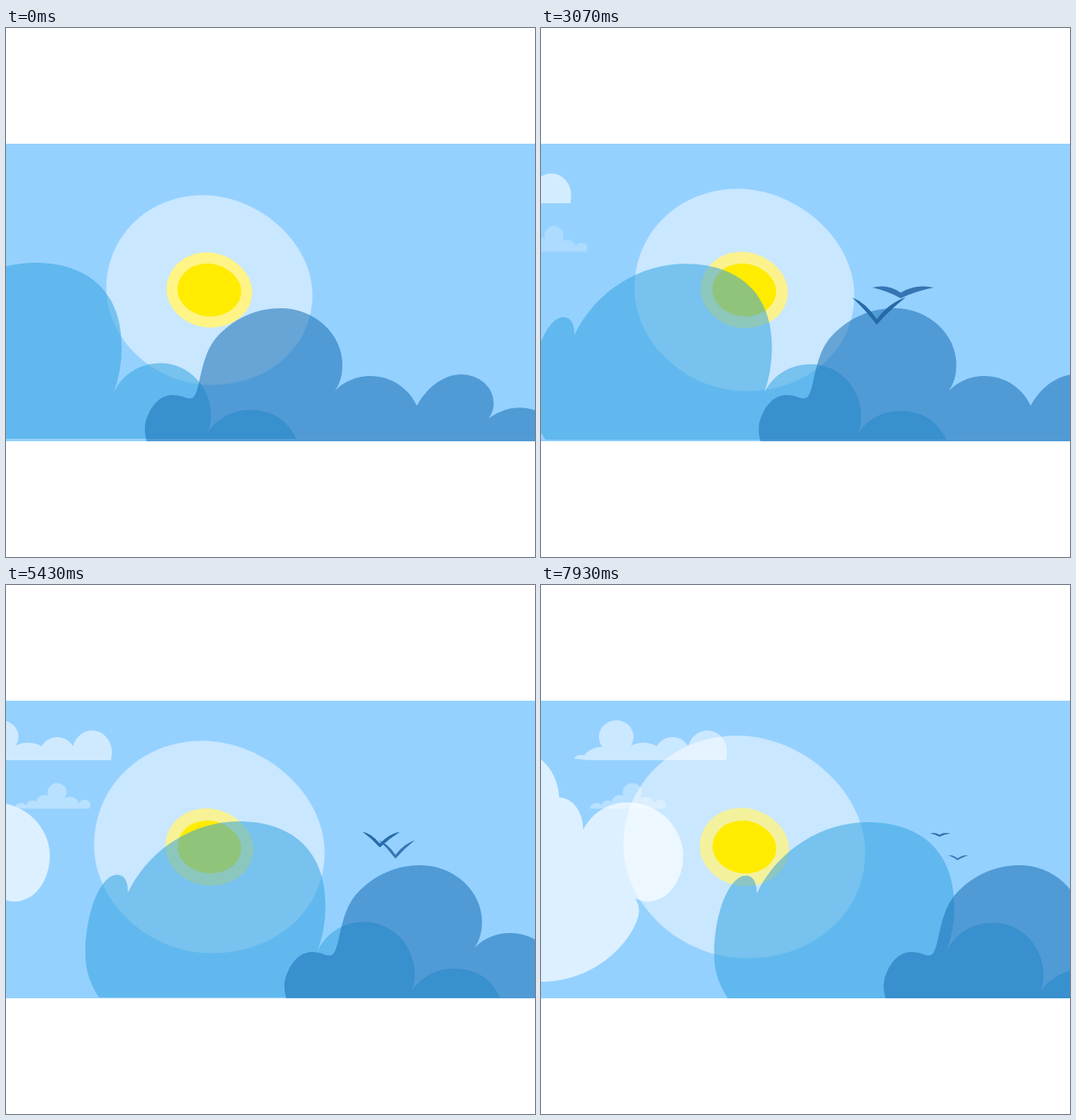
An HTML page that plays this animation: 640x640 px, repeating every 8 s.

```html
<!DOCTYPE html>
<html lang="en">
<head>
<meta charset="utf-8">
<title>Sun and clouds</title>
<style>
html, body { margin: 0; width: 100%; height: 100%; overflow: hidden; background: #fff; }
svg { display: block; width: 100%; height: 100%; }
</style>
</head>
<body>
<svg viewBox="0 0 640 640">
  <defs>
    <clipPath id="sky"><rect y="140" width="640" height="360"/></clipPath>
    <path id="blob" d="M-1-.02C-1-.56-.6-1-.06-1S1-.5 1 .05S.57 1 .02 1S-1 .52-1-.02Z"/>
  </defs>
  <g clip-path="url(#sky)">
    <rect y="140" width="640" height="360" fill="#95d1ff"/>
    <use id="glow" href="#blob" fill="#c9e7ff"/>
    <use id="ring" href="#blob" fill="#fff485"/>
    <use id="sun" href="#blob" fill="#ffec00"/>
    <path id="wisp" fill="#fff" d="M59 270.5A8 8 0 0 1 73 266.5A8 8 0 0 1 85 262A11 11 0 0 1 100 255A11.5 11 0 1 1 118 259A12 12 0 0 1 137 264A8 8 0 0 1 149.5 262Q152.5 265 149.5 270.5Z"/>
    <path id="high" fill="#fff" d="M40 210A9 6 0 0 1 52 206A30 24 0 0 1 74 195.5A21 20 0 1 1 109 194A36 36 0 0 1 140 195A22 22 0 0 1 178 195A24 26 0 0 1 225 200Q225 207 224 212H66Q52 212 40 210Z"/>
    <path id="white" fill="#fff" opacity=".68" d="M0 211Q20 228 22 257A29 39 0 0 1 51 296C62 275 82 263 104 263A68 65 0 0 1 172 328A43 55 0 0 1 129 383Q121 383 114 379Q122 392 116 406C103 440 60 480 0 480Z"/>
    <path id="light" fill="#35a5e0" opacity=".55" d="M226 500Q209 475 209.5 446C210 396 228 351.5 248 351.5Q261 352 261 373C288 318 342 287 395 287C463 287 500 326 500 388Q500 420 489 447C498 424 520 408.5 547 408.5A61 64 0 0 1 608 472Q608 483 604 492C617 474 635 465 655 465Q695 465 711 500Z"/>
    <path id="dark" fill="#196fb4" opacity=".55" d="M170 500Q165 482 172 468C180 450 191 444 202 444S217 449 224 448C236 446 232 402 254 375C276 350 305 339 332 339A75 69 0 0 1 407 408Q407 426 398 439C408 428 424 421 441 421C465 421 487 435 497 457C508 436 529 419 551 419A39 35 0 0 1 590 454Q590 464 584 472Q615 450 650 466V500Z"/>
    <path id="birdA" fill="#2568a6"/>
    <path id="birdB" fill="#2b6cab"/>
  </g>
</svg>
<script>
const LOOP = 8000, END = 7930;
const el = id => document.getElementById(id);
const mix = (a, b, u) => a + (b - a) * u;
const clamp = (v, a = 0, b = 1) => Math.min(b, Math.max(a, v));

// Drift in px/ms; "zero" is when the path stands where it was drawn.
const drifts = [
  { node: el('wisp'), speed: .0195, zero: END },
  { node: el('high'), speed: .0388, zero: END },
  { node: el('white'), speed: .0476, zero: END },
  { node: el('light'), speed: .0454, zero: END, sink: 3 / END },
  { node: el('dark'), speed: .0311, zero: 0 }
];

// Each bird eases from x0 to x1; climb and dip shape its height around y.
const birds = [
  { node: el('birdA'), start: 2700, x0: 383, x1: 482, ease: .55,
    y: 302.5, climb: 50, power: 3, dip: 0, beat: 1140, peak: 2956, alpha: .97 },
  { node: el('birdB'), start: 1860, x0: 409, x1: 504, ease: .8,
    y: 330, climb: 40, power: 6, dip: 25, beat: 1050, peak: 2385, alpha: .9 }
];

function birdPath(x, y, span, lift) {
  const half = span * (1 - .8 * lift * lift);
  const tipY = y - span * lift / 2, low = y + span * lift / 2, top = low - span * .09;
  const tips = [x - half * .46, x + half * .54];
  const curve = (tipX, bodyY, bow) =>
    `Q${mix(tipX, x, .55)} ${mix(tipY, bodyY, .55) - span * bow} `;
  return `M${tips[0]} ${tipY}` + curve(tips[0], top, .11) + `${x} ${top}` +
    curve(tips[1], top, .11) + `${tips[1]} ${tipY}` +
    curve(tips[1], low, .04) + `${x} ${low}` +
    curve(tips[0], low, .04) + `${tips[0]} ${tipY}Z`;
}

function drawBird(b, t) {
  const u = clamp((t - b.start) / (END - b.start)), rest = 1 - u;
  const x = mix(b.x0, b.x1, u ** b.ease);
  const y = b.y + b.climb * rest ** b.power - b.dip * rest;
  const span = mix(89, 25, (t - 1860) / (END - 1860));
  const lift = .28 + .19 * Math.cos(2 * Math.PI * (t - b.peak) / b.beat);
  b.node.setAttribute('opacity', b.alpha * clamp((t - b.start + 400) / 400));
  b.node.setAttribute('d', birdPath(x, y, span, lift));
}

function place(id, rx, ry, grow = 1) {
  el(id).setAttribute('transform', `translate(246 317) scale(${rx * grow} ${ry * grow})`);
}

function draw(t) {
  const u = t / END;
  place('glow', 124.7, 114.8, 1 + .173 * u);
  place('ring', 51.8, 45.4, 1 + .044 * u);
  place('sun', 38.5, 32);
  el('ring').setAttribute('opacity', 1 - .2 * u);
  el('wisp').setAttribute('opacity', clamp(.08 + (t - 1860) * .000115, 0, .33));
  el('high').setAttribute('opacity', .66 - .16 * u);
  for (const { node, speed, zero, sink = 0 } of drifts) {
    const dt = t - zero;
    node.setAttribute('transform', `translate(${speed * dt} ${sink * dt})`);
  }
  for (const b of birds) drawBird(b, t);
}

const start = performance.now();
function tick(now) {
  draw(Math.max(0, now - start) % LOOP);
  requestAnimationFrame(tick);
}
draw(0);
requestAnimationFrame(tick);
</script>
</body>
</html>
```
